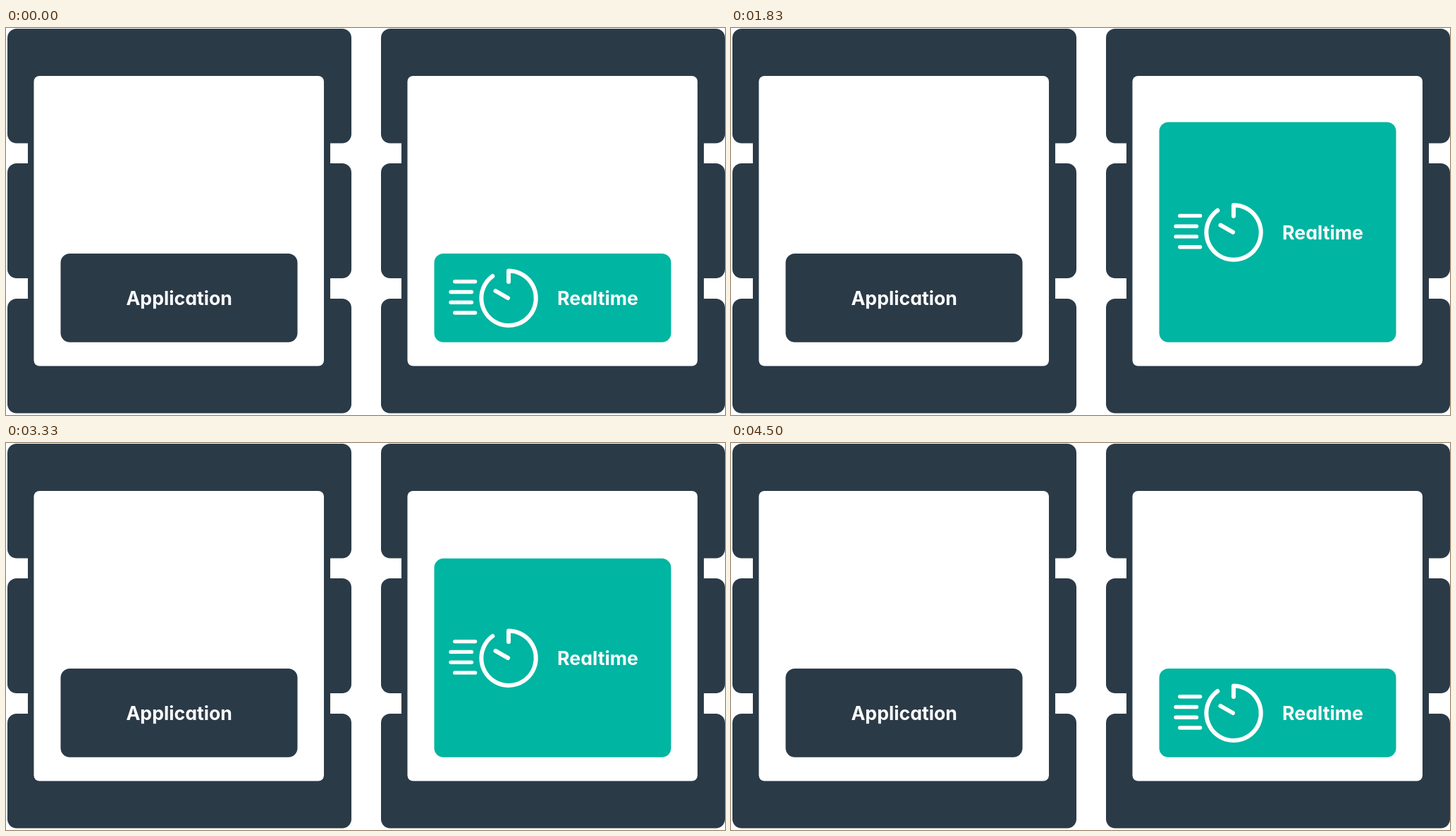
These frames come from a looping animation (1020x549 px, 4530 ms). An HTML page:

```html
<!DOCTYPE html>
<html lang="en">
<head>
<meta charset="utf-8">
<title>Realtime scaling</title>
<style>
  html, body { margin: 0; width: 100%; height: 100%; overflow: hidden; background: #fff; }
  svg { display: block; width: 1020px; height: 549px; }
  .dark { fill: #2b3a47; }
  .teal { fill: #00b5a1; }
  text {
    font: 700 26.7px Inter, Lato, sans-serif;
    font-feature-settings: "cv11";
    fill: #fff;
    text-anchor: middle;
  }
  .icon { fill: none; stroke: #fff; stroke-width: 6; stroke-linecap: round; stroke-linejoin: round; }
</style>
</head>
<body>
<svg viewBox="0 0 1020 549">
  <defs>
    <g id="server">
      <g class="dark">
        <rect x="2" y="1" width="488" height="162.5" rx="13"/>
        <rect x="2" y="192" width="488" height="163" rx="13"/>
        <rect x="2" y="384" width="488" height="162.5" rx="13"/>
        <rect x="31" y="140" width="429" height="270"/>
      </g>
      <rect x="39.5" y="68" width="411.5" height="411.5" rx="8" fill="#fff"/>
    </g>
  </defs>

  <use href="#server"/>
  <rect class="dark" x="77.5" y="320" width="336" height="125.7" rx="13"/>
  <text x="245.7" y="393">Application</text>

  <use href="#server" x="530"/>
  <rect id="card" class="teal" x="607.5" y="320" width="336" height="125.7" rx="13"/>
  <g id="label">
    <g class="icon">
      <path d="M713 360V344.6A38.7 38.7 0 1 1 690.3 352"/>
      <path d="M694.5 373L712 383"/>
      <path stroke-width="5.4" d="M636.8 359.7H665.6M631 374.5H660.5M631 389.2H660.5M636.8 404H665.6"/>
    </g>
    <text x="839.5" y="393">Realtime</text>
  </g>
</svg>
<script>
  const LOOP = 4530, MOVE = 1800, GROW_AT = 450, SHRINK_AT = 2700;
  const BASE_TOP = 320, BOTTOM = 445.7, GROWTH = 210;
  const card = document.getElementById('card');
  const label = document.getElementById('label');

  // cubic-bezier(.42, 0, .58, 1), solved by bisection
  function easeInOut(x) {
    if (x <= 0) return 0;
    if (x >= 1) return 1;
    let low = 0, high = 1, s = 0.5;
    for (let i = 0; i < 24; i++) {
      s = (low + high) / 2;
      const at = 1.26 * s * (1 - s) ** 2 + 1.74 * s * s * (1 - s) + s ** 3;
      if (at < x) low = s; else high = s;
    }
    return s * s * (3 - 2 * s);
  }

  function draw(now) {
    const t = now % LOOP;
    const rise = GROWTH * (easeInOut((t - GROW_AT) / MOVE) - easeInOut((t - SHRINK_AT) / MOVE));
    card.setAttribute('y', BASE_TOP - rise);
    card.setAttribute('height', BOTTOM - BASE_TOP + rise);
    label.setAttribute('transform', `translate(0 ${-rise / 2})`);
  }

  const start = performance.now();
  (function tick() {
    draw(performance.now() - start);
    requestAnimationFrame(tick);
  })();
</script>
</body>
</html>
```
